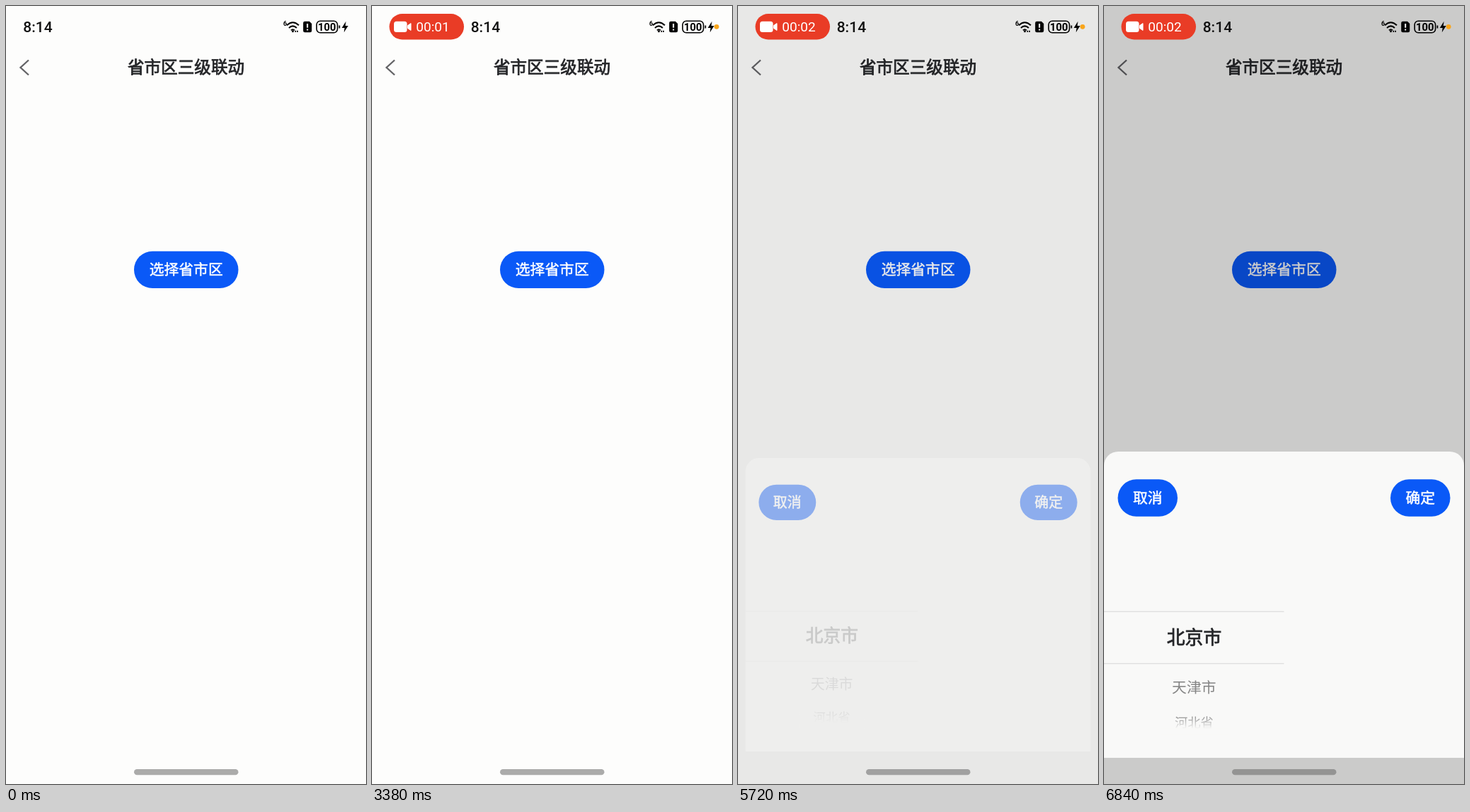
Write an HTML page that moves like this. It is 509 px wide and 1100 px high and loops after 8000 ms.

```html
<!DOCTYPE html>
<html lang="zh-CN">
<head>
<meta charset="utf-8">
<style>
html, body { margin: 0; width: 100%; height: 100%; overflow: hidden; background: #fdfdfc; }
svg { display: block; width: 100%; height: 100%; }
text { font-family: "Noto Sans CJK SC", "Noto Sans CJK", sans-serif; text-anchor: middle; }
.num { font-family: Roboto, Inter, sans-serif; text-anchor: start; }
.blue { fill: #0a59f7; }
/* A thin outline gives the medium weight. */
.label { fill: #fff; font-size: 20.8px; stroke: #fff; stroke-width: .5; }
.strong { fill: #252629; stroke: #252629; stroke-width: .8; }
</style>
</head>
<body>
<svg viewBox="0 0 509 1100" preserveAspectRatio="none">
  <defs>
    <linearGradient id="fade" x2="0" y2="1">
      <stop offset="0" stop-color="#f9f9f8" stop-opacity="0"/>
      <stop offset="1" stop-color="#f9f9f8"/>
    </linearGradient>
  </defs>
  <rect width="509" height="1100" fill="#fdfdfc"/>

  <g id="page">
    <path d="M32 76.5 20.5 87 32 97.5" fill="none" stroke="#636366" stroke-width="2.3"/>
    <text class="strong" x="254.5" y="95" font-size="23.6">省市区三级联动</text>
    <rect class="blue" x="181" y="346.7" width="147.5" height="52.4" rx="26.2"/>
    <text class="label" x="254.7" y="380.3">选择省市区</text>
  </g>
  <circle id="touch" cx="274" cy="368.5" r="13.3" fill="#dfe6f5" fill-opacity=".6" stroke="#b9c6e4" stroke-opacity=".5"/>
  <rect id="shade" width="509" height="1100"/>

  <g id="sheet">
    <path d="M0 1063V650a20 20 0 0 1 20-20H489a20 20 0 0 1 20 20V1063Z" fill="#f9f9f8"/>
    <rect class="blue" x="19.5" y="669.3" width="84.5" height="52.4" rx="26.2"/>
    <text class="label" x="61.7" y="703">取消</text>
    <rect class="blue" x="405" y="669.3" width="84.5" height="52.4" rx="26.2"/>
    <text class="label" x="447.2" y="703">确定</text>
    <g id="picker">
      <path d="M0 856.2H254.5M0 929.8H254.5" stroke="#d6d6d6"/>
      <text class="strong" x="127.5" y="901.6" font-size="25.8">北京市</text>
      <text x="127.3" y="971.3" font-size="20.8" fill="#858585">天津市</text>
      <text x="127.3" y="1019.6" font-size="18.3" fill="#858585">河北省</text>
      <rect x="80" y="1002" width="95" height="20" fill="url(#fade)"/>
      <rect x="80" y="1021.5" width="95" height="8" fill="#f9f9f8"/>
    </g>
  </g>

  <g id="status">
    <g id="pill">
      <rect x="24.5" y="11" width="105.5" height="36.5" rx="18.25" fill="#e93c26"/>
      <rect x="31" y="21.8" width="18.5" height="15.2" rx="3.5" fill="#fff"/>
      <path d="M50.5 27.5 55 24.5V34.5L50.5 31.5Z" fill="#fff" stroke="#fff" stroke-linejoin="round"/>
      <text id="timer" class="num" x="62.3" y="36.2" font-size="19" fill="#fff"></text>
    </g>
    <text id="clock" class="num" y="36.5" font-size="21" font-weight="500" fill="#111">8:14</text>
    <text class="num" x="392" y="27.5" font-size="9" font-weight="700">6</text>
    <g fill="none" stroke="#000" stroke-width="2">
      <path d="M397 27.2Q405.5 19.2 414 27.2M400 31Q405.5 25.8 411 31M403 34.4Q405.5 32 408 34.4"/>
      <rect x="439.2" y="21.3" width="29.4" height="16.4" rx="5" stroke-width="1.6"/>
      <path d="M471.4 27.5V31.5" stroke-width="1.8"/>
    </g>
    <circle cx="405.5" cy="35.8" r="1.5"/>
    <path d="M408.5 35.8h1.6m1.2 0h1.6" stroke="#000" stroke-width="2.2"/>
    <path d="M422.5 21.8H429L432.3 25V35a2.3 2.3 0 0 1-2.3 2.3H422.5a2.3 2.3 0 0 1-2.3-2.3V24a2.3 2.3 0 0 1 2.3-2.2Z"/>
    <path d="M426.2 25V30.8M426.2 32.5V34.6" stroke="#fff" stroke-width="2"/>
    <text class="num" x="441" y="34.9" font-size="14.8" font-weight="700">100</text>
    <path d="M480.6 21.8 474.8 31H478.7L477.8 37.3 483.8 28H479.8Z"/>
    <circle id="dot" cx="487.2" cy="29.3" fill="#f9a51a"/>
  </g>
  <rect x="181" y="1079" width="147.5" height="8.3" rx="4.15" fill="#666" fill-opacity=".54"/>
</svg>
<script>
const LOOP = 8000;
const el = id => document.getElementById(id);
const [touch, shade, sheet, picker, pill, timer, clock, dot] =
  ["touch", "shade", "sheet", "picker", "pill", "timer", "clock", "dot"].map(el);

const linear = u => u;
const smooth = u => u * u * (3 - 2 * u);

// Interpolates through [time, value] pairs.
function track(t, keys, ease = smooth) {
  if (t <= keys[0][0]) return keys[0][1];
  for (let i = 1; i < keys.length; i++) {
    const [t0, a] = keys[i - 1], [t1, b] = keys[i];
    if (t < t1) return a + (b - a) * ease((t - t0) / (t1 - t0));
  }
  return keys[keys.length - 1][1];
}

const zoom = (cx, cy, s) => `translate(${cx} ${cy}) scale(${s}) translate(${-cx} ${-cy})`;

function draw(t) {
  // The pill springs open and pushes the clock aside.
  const grow = track(t, [[20, 0], [820, .78], [1000, 1.13], [1140, 1.035], [1240, 1.035],
    [1560, .97], [1900, 1.06], [2400, .985], [2640, 1.02], [2920, 1]]);
  pill.setAttribute("transform", zoom(77.25, 29.25, grow));
  pill.setAttribute("opacity", Math.min(1, grow * 1.6));
  clock.setAttribute("x", 24.3 + 115.4 * grow);
  timer.textContent = t < 3360 ? "00:00" : t < 5420 ? "00:01" : "00:02";
  dot.setAttribute("r", 3.4 * track(t, [[1480, 0], [1800, 1.5], [2250, 1]]));

  touch.setAttribute("opacity", t < 5320 ? 0 : track(t, [[5400, 1], [5460, 0]]));

  const open = track(t, [[5600, 0], [5720, .4], [5900, 1]], linear);
  shade.setAttribute("opacity", .2 * open);
  sheet.setAttribute("opacity", open);
  picker.setAttribute("opacity", track(t, [[5640, 0], [5720, .42], [5860, 1]], linear));
  const scale = track(t, [[5600, .92], [5720, .958], [5980, 1.006], [6040, 1.006], [6280, 1.001], [6840, 1]], linear);
  sheet.setAttribute("transform", zoom(254.5, 846.5, scale));
}

const start = performance.now();
function tick() {
  draw((performance.now() - start) % LOOP);
  requestAnimationFrame(tick);
}
tick();
</script>
</body>
</html>
```
